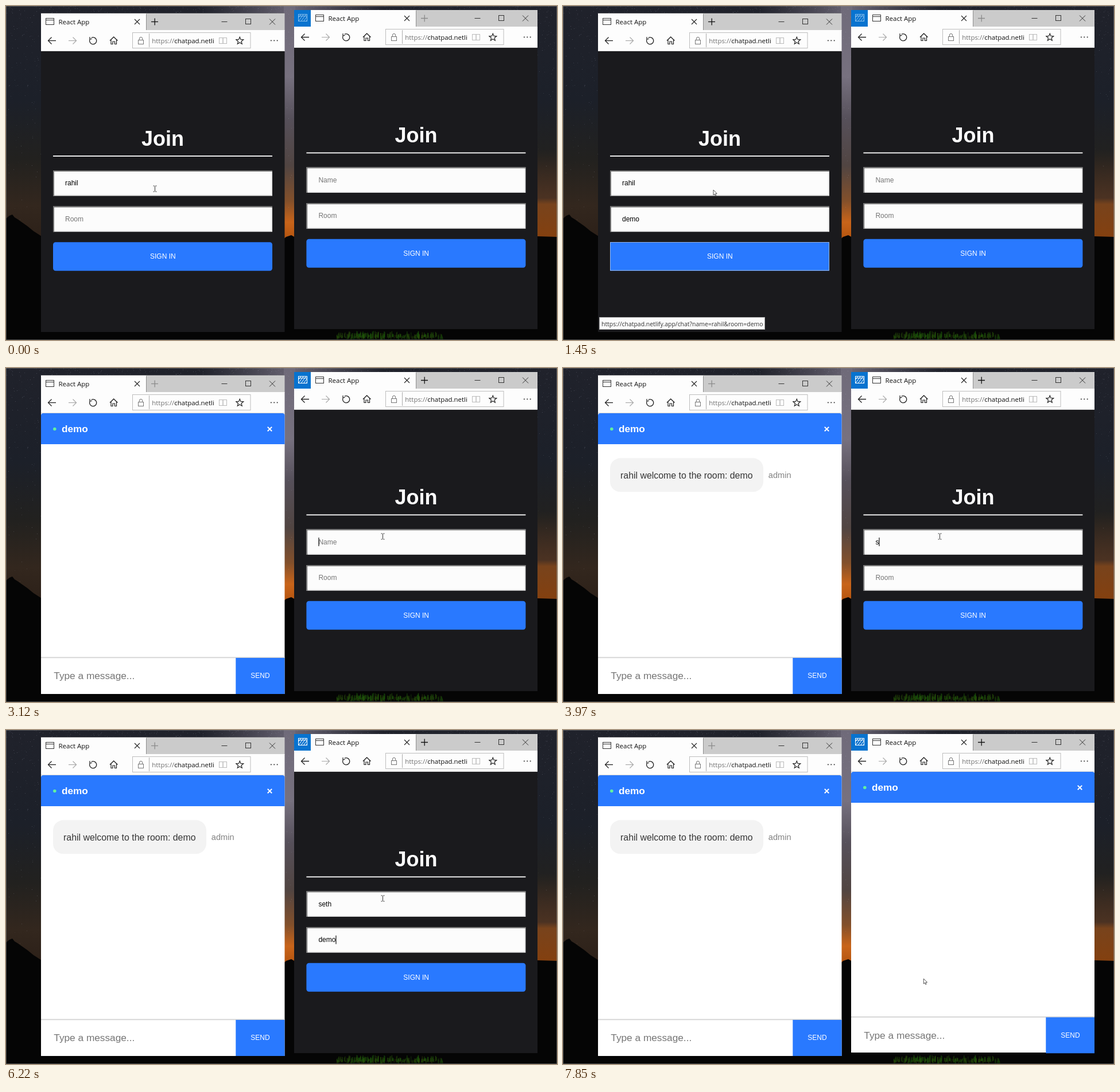
An HTML page with a canvas for the animation above (8 s loop, 960x583 px).

```html
<!DOCTYPE html>
<html lang="en">
<head>
<meta charset="utf-8">
<title>Chat room demo</title>
<style>
  html, body { margin: 0; width: 100%; height: 100%; overflow: hidden; background: #000; }
  canvas { display: block; width: 960px; height: 583px; }
</style>
</head>
<body>
<canvas id="stage" width="960" height="583"></canvas>
<script>
const W = 960, H = 583, LOOP = 8000;
const UI = '"Open Sans", "Noto Sans", sans-serif';
const PAGE = '"Liberation Sans", Arial, sans-serif';
const BLUE = '#2979ff', DARK = '#1a1a1d', PAPER = '#fdfdfd';
const LEFT_USER = 'rahil', RIGHT_USER = 'seth', ROOM = 'demo';
const stage = document.getElementById('stage').getContext('2d');
let c = stage;

// ---- drawing helpers ----
function rect(x, y, w, h, fill) {
  c.fillStyle = fill;
  c.fillRect(x, y, w, h);
}
function round(x, y, w, h, r, fill) {
  c.fillStyle = fill;
  c.beginPath();
  c.roundRect(x, y, w, h, r);
  c.fill();
}
function frame(x, y, w, h, color) {
  c.strokeStyle = color;
  c.lineWidth = 1;
  c.strokeRect(x, y, w, h);
}
function path(points, color, width = 1, close = false) {
  c.strokeStyle = color;
  c.lineWidth = width;
  c.beginPath();
  points.forEach(([x, y], i) => i ? c.lineTo(x, y) : c.moveTo(x, y));
  if (close) c.closePath();
  c.stroke();
}
function text(str, x, y, font, color, align = 'left') {
  c.font = font;
  c.fillStyle = color;
  c.textAlign = align;
  c.fillText(str, x, y);
  return c.measureText(str).width;
}
function cross(x, y, r, color, width = 1) {
  path([[x - r, y - r], [x + r, y + r]], color, width);
  path([[x + r, y - r], [x - r, y + r]], color, width);
}
function shifted(dx, dy, draw) {
  c.save();
  c.translate(dx, dy);
  draw();
  c.restore();
}
function clipped(x, y, w, h, draw) {
  c.save();
  c.beginPath();
  c.rect(x, y, w, h);
  c.clip();
  draw();
  c.restore();
}
// Latest value whose start time has passed.
function at(t, keys) {
  let value = keys[0][1];
  for (const [start, v] of keys) if (t >= start) value = v;
  return value;
}

// ---- night sky wallpaper ----
function gradient(x0, y0, x1, y1, stops) {
  const g = c.createLinearGradient(x0, y0, x1, y1);
  stops.forEach(([p, color]) => g.addColorStop(p, color));
  return g;
}
function makeSky() {
  const canvas = document.createElement('canvas');
  canvas.width = W;
  canvas.height = H;
  c = canvas.getContext('2d');
  rect(0, 0, W, H, gradient(0, 0, 0, 410, [
    [0, '#20222b'], [0.4, '#1c2029'], [0.65, '#22211f'], [0.85, '#33271e'], [1, '#2c2018']]));
  rect(340, 0, 320, 14, gradient(340, 0, 660, 0, [
    [0, 'rgba(110,105,120,0)'], [0.5, 'rgba(125,118,135,.8)'], [1, 'rgba(110,105,120,0)']]));
  rect(484, 0, 20, 410, gradient(0, 0, 0, 410, [
    [0, '#6f6a79'], [0.3, '#77717f'], [0.48, '#56505a'], [0.68, '#514542'],
    [0.83, '#83502b'], [0.92, '#c8641a'], [1, '#b3530e']]));
  rect(920, 250, 40, 155, gradient(0, 250, 0, 405, [
    [0, 'rgba(70,48,34,0)'], [0.55, '#4b3222'], [0.62, '#78431c'], [1, '#84400f']]));
  let seed = 7;
  const rnd = () => (seed = (seed * 16807) % 2147483647) / 2147483647;
  for (let i = 0; i < 2600; i++) {
    const x = rnd() * W, y = rnd() * rnd() * 380, a = rnd() * 0.22;
    rect(x | 0, y | 0, 1, 1, `rgba(205,210,230,${a})`);
  }
  c.fillStyle = '#050505';
  c.beginPath();
  [[0, 371], [6, 366], [11, 364], [15, 369], [20, 372], [27, 377], [37, 384], [48, 393],
   [62, 402], [480, 410], [488, 403], [497, 400], [506, 405], [926, 402], [960, 403],
   [960, 583], [0, 583]].forEach(([x, y]) => c.lineTo(x, y));
  c.fill();
  for (let i = 0; i < 260; i++) {
    const x = 575 + rnd() * 185, h = 2 + rnd() * 8;
    rect(x, 577 - h + rnd() * 5, 1.5, h, `rgba(${20 + rnd() * 30 | 0},${55 + rnd() * 45 | 0},12,.55)`);
  }
  frame(0.5, 0.5, W - 1, H - 1, 'rgba(130,130,130,.55)');
  c = stage;
  return canvas;
}

// ---- browser chrome, in left window coordinates ----
function tab(active) {
  const ink = '#222';
  rect(61, 13, 183, 30, PAPER);
  rect(244, 14, 1, 28, '#8f8f8f');
  frame(69.5, 21.5, 14, 11, '#333');
  path([[69, 24.5], [84, 24.5]], '#333');
  text('React App', 91.5, 31.7, '11.5px ' + UI, '#111');
  cross(228.5, 27.5, 4.5, ink, 1.1);
  const plus = active ? '#111' : '#8b8b8b';
  path([[253, 27.5], [265, 27.5]], plus, 1.3);
  path([[259.2, 21.5], [259.2, 33.5]], plus, 1.3);
}
function asideIcon(active) {
  const ink = active ? '#fff' : '#86bdeb';
  rect(502, 7, 29, 29, '#0873cf');
  frame(509.5, 14.5, 15, 12, ink);
  clipped(510, 15, 14, 11, () => {
    for (let x = 504; x < 530; x += 4.5) path([[x, 28], [x + 11, 13]], ink);
  });
  path([[510, 17.5], [524, 17.5]], ink);
}
function toolbar() {
  const ink = '#222', pale = '#a9a9a9';
  rect(61, 42, 424.5, 37, PAPER);
  rect(61, 78, 424.5, 1, '#d6d6d6');
  path([[87, 60.5], [73.5, 60.5]], ink, 1.3);
  path([[79.5, 54.5], [73.5, 60.5], [79.5, 66.5]], ink, 1.3);
  path([[109, 60.5], [122.5, 60.5]], pale, 1.2);
  path([[116.5, 54.5], [122.5, 60.5], [116.5, 66.5]], pale, 1.2);
  c.strokeStyle = ink;
  c.lineWidth = 1.3;
  c.beginPath();
  c.arc(151.7, 60.7, 6, -2.1, 3.75);
  c.stroke();
  path([[146, 54], [146, 57.5], [149.8, 57.5]], ink, 1.2);
  path([[181, 60.5], [187.7, 54], [194.5, 60.5]], ink, 1.3);
  path([[183, 59], [183, 66.5], [186, 66.5], [186, 62], [189.5, 62], [189.5, 66.5],
        [192.5, 66.5], [192.5, 59]], ink, 1.2);

  frame(220.5, 46.5, 205.5, 27, '#bdbdbd');
  frame(230.5, 59.5, 9, 7, '#777');
  c.beginPath();
  c.arc(235, 57, 2.7, Math.PI, 0);
  c.lineTo(237.7, 59.5);
  c.moveTo(232.3, 57);
  c.lineTo(232.3, 59.5);
  c.stroke();
  path([[249.5, 48], [249.5, 72]], '#ababab');
  clipped(251, 48, 111, 24, () => {
    const font = '11.45px ' + UI;
    const w = text('https://', 254.3, 64.5, font, '#707070');
    text('chatpad.netlify.app', 254.3 + w, 64.5, font, '#111');
  });
  frame(371.5, 55.5, 6.5, 10, '#bbb');
  frame(378, 55.5, 6.5, 10, '#bbb');
  const star = [];
  for (let i = 0; i < 10; i++) {
    const a = -Math.PI / 2 + i * Math.PI / 5, r = i % 2 ? 2.9 : 6.7;
    star.push([407.3 + r * Math.cos(a), 60.8 + r * Math.sin(a)]);
  }
  path(star, ink, 1.2, true);
  for (let i = 0; i < 3; i++) rect(461 + i * 5.4, 59.5, 1.7, 1.7, ink);
}
function chrome(active, right) {
  const dx = right ? 441 : 0, dy = right ? -6 : 0;
  shifted(dx, dy, () => {
    rect(61, 13, 424.5, 30, '#cbcbcb');
    rect(61, 12.5, 424.5, 0.5, '#888');
    path([[375.5, 27.5], [385.5, 27.5]], '#333');
    frame(417.5, 22.5, 9, 9, '#333');
    cross(464, 27.5, 5, '#333');
    toolbar();
  });
  shifted(right ? 470 : 0, dy, () => tab(active));
  if (right) asideIcon(active);
}

// ---- pages ----
function field(y, value, hint, caret) {
  const x = 82, w = 382, h = 44.5;
  rect(x, y, w, h, '#e4e4e4');
  rect(x, y, w, 2, '#767676');
  rect(x, y, 2, h, '#767676');
  rect(x + 2, y + 2, w - 4, h - 4, '#fcfcfc');
  const base = y + 26.2, font = '12px ' + PAGE;
  const tw = text(value || hint, 103, base, font, value ? '#000' : '#757575');
  if (caret) rect(103 + (value ? tw : 0), base - 11.7, 1.1, 15, '#000');
}
function joinPage(s) {
  rect(61, 79, 424.5, s.right ? 491 : 490, DARK);
  shifted(s.right ? 0.4 : 0, s.right ? 0.5 : 0, () => {
    text('Join', 273, 243.7, 'bold 36px ' + PAGE, '#fff', 'center');
    rect(82, 261, 382, 1.8, '#fff');
    field(287, s.name, 'Name', s.caret === 1);
    field(349.7, s.room, 'Room', s.caret === 2);
    round(82, 412.3, 382, 50, s.focus ? 0 : 4.5, BLUE);
    if (s.focus) {
      c.setLineDash([1, 1]);
      frame(82.5, 412.5, 381, 49, '#fff');
      c.setLineDash([]);
    }
    text('SIGN IN', 273.3, 441.2, '12px ' + PAGE, '#fff', 'center');
  });
  if (s.focus) {
    rect(63, 543, 289, 22, '#fbfbfb');
    frame(63.5, 543.5, 288, 21, '#a5a5a5');
    text(`https://chatpad.netlify.app/chat?name=${s.name}&room=${s.room}`,
      67, 558.6, '10.45px ' + UI, '#333');
  }
}
function chatPage(s) {
  rect(61, 79, 424.5, 490, '#fff');
  round(61, 79, 424.5, 54, [4, 4, 0, 0], BLUE);
  c.fillStyle = '#62f0a0';
  c.beginPath();
  c.arc(84.8, 106.5, 2.8, 0, 7);
  c.fill();
  text(ROOM, 97, 112.2, 'bold 17.2px ' + PAGE, '#fff');
  cross(459.5, 106.6, 3.7, '#fff', 2);
  if (s.message) {
    round(82, 157.3, 267, 59, 18, '#f3f3f3');
    text(`${LEFT_USER} welcome to the room: ${ROOM}`, 100, 192.6, '15.9px ' + PAGE, '#353535');
    text('admin', 357.8, 192.2, '14.6px ' + PAGE, '#828282');
  }
  shifted(0, s.right ? 1.5 : 0, () => {
    rect(61, 504.5, 424.5, 1.8, '#d3d3d3');
    text('Type a message...', 83.3, 543.2, '17.25px ' + PAGE, '#757575');
    rect(400.3, 506, 85.2, 63, BLUE);
    text('SEND', 443, 541.2, '12px ' + PAGE, '#fff', 'center');
  });
}

// ---- mouse pointer ----
function beam(x, y) {
  path([[x, y - 4.5], [x, y + 4.5]], '#333');
  for (const k of [-5, 5]) {
    path([[x - 3, y + k], [x - 0.8, y + k]], '#333');
    path([[x + 0.8, y + k], [x + 3, y + k]], '#333');
  }
}
function arrow(x, y) {
  const shape = [[0, 0], [0, 9], [2, 7.2], [3.4, 10.2], [4.8, 9.6], [3.5, 6.7], [6.2, 6.4]]
    .map(([a, b]) => [x + a, y + b]);
  c.fillStyle = '#fff';
  c.beginPath();
  shape.forEach(p => c.lineTo(...p));
  c.fill();
  path(shape, '#444', 0.9, true);
}
const pointerKeys = [
  [0, [beam, 259.5, 319]], [1450, [arrow, 262, 321]],
  [2030, [arrow, 300, 317]], [2160, [arrow, 424, 305]], [2300, [beam, 592, 297]],
  [2430, [beam, 656.5, 294]], [6970, [beam, 650, 318]], [7120, [arrow, 636, 396]],
  [7270, [arrow, 628.3, 434]]
];

// ---- timeline ----
function leftPage(t) {
  if (t >= 1610) return chatPage({ message: t >= 3590 });
  joinPage({
    name: LEFT_USER,
    room: ROOM.slice(0, at(t, [[0, 0], [120, 2], [360, 4]])),
    caret: at(t, [[0, 0], [120, 2], [770, 0]]),
    focus: t >= 920
  });
}
function rightPage(t) {
  if (t >= 7850) return chatPage({ right: true });
  joinPage({
    right: true,
    name: RIGHT_USER.slice(0, at(t, [[0, 0], [3900, 1], [4060, 2], [4370, 3], [4650, 4]])),
    room: ROOM.slice(0, at(t, [[0, 0], [5760, 1], [5910, 2], [6070, 3], [6220, 4]])),
    caret: at(t, [[0, 0], [2980, 1], [3430, 0], [3740, 1], [4930, 2], [5330, 0],
                  [5460, 2], [6500, 0], [6660, 2], [7120, 0]])
  });
}

const sky = makeSky();
function draw(t) {
  c.drawImage(sky, 0, 0);
  const swapped = t >= 2830;
  leftPage(t);
  chrome(!swapped, false);
  clipped(502, 7, 424, 557.5, () => {
    shifted(441, -6, () => rightPage(t));
    chrome(swapped, true);
  });
  const [shape, x, y] = at(t, pointerKeys);
  shape(x, y);
}

const start = performance.now();
function tick() {
  draw((performance.now() - start) % LOOP);
  requestAnimationFrame(tick);
}
tick();
</script>
</body>
</html>
```
